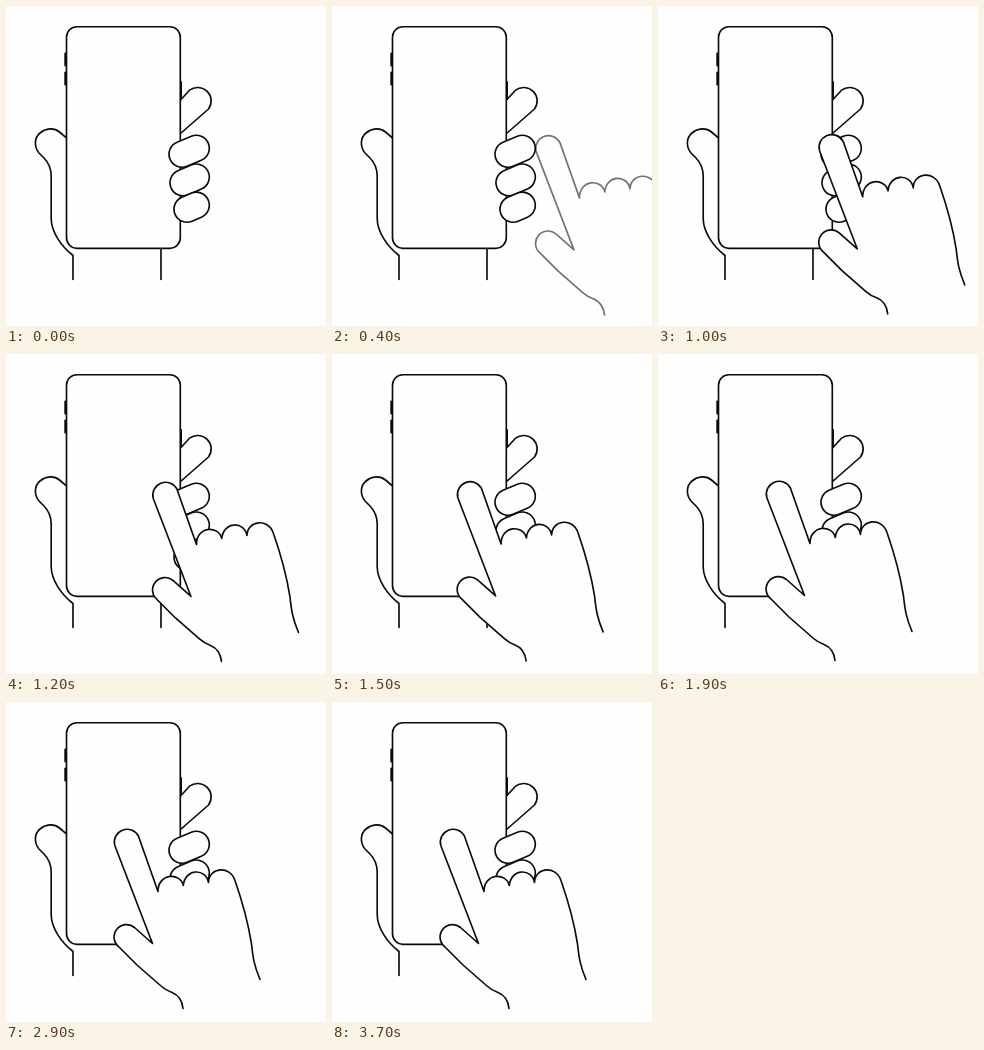
Write an HTML page that moves like this. It is 320 by 320 pixels and loops after 3.8 s.

```html
<!DOCTYPE html>
<html lang="en">
<head>
<meta charset="utf-8">
<title>Hand tapping a phone</title>
<style>
  html, body { margin: 0; width: 100%; height: 100%; overflow: hidden; background: #fefefe; }
  svg { display: block; width: 100vw; height: 100vh; }
  .line { fill: none; stroke: #0b0b0b; stroke-width: 1.65; stroke-linecap: round; stroke-linejoin: round; }
  .solid { fill: #fefefe; }
</style>
</head>
<body>
<svg viewBox="0 0 320 320">
  <g class="line">
    <!-- holding hand, behind the phone -->
    <path d="M60 131.500L53.500 126C48 121.500 40 122 34 127C28 132 28 141 33 147L38 152Q45 159 45.200 170V213C45.500 226 55 240 67 249.500V273.500" />
    <path d="M155 243V273.500" />
    <path d="M174.500 94L183.500 84.200A13.500 13.500 0 0 1 202.500 103L174.500 127.500" />
    <path d="M59.300 47.500V59.500M59.300 66.500V78.500M175 76V92" stroke-width="2" />
    <rect class="solid" x="60.500" y="20.700" width="113.800" height="221.600" rx="10.500" />
    <g id="grip" class="solid"></g>
  </g>
  <g id="hand" class="line" opacity="0">
    <path class="solid" d="M177 306.500C176 298 172.500 293 166 290.500Q160 288.500 155 284L131 263L112.500 244.500
      A12.300 12.300 0 0 1 128.500 225.500L146.500 241.500L108.800 143.500
      A12.800 12.800 0 0 1 132.400 134L152 189.500
      C152 171 174 170 177.300 183.500C179 166 200 166 202.500 180.500
      C203 165 224 163 229 178.500Q241 213 245.500 242C247 256 248 263 254 277.500" />
  </g>
</svg>
<script>
  const LOOP = 3800, STEP = 100;
  const FADE_END = 700, MOVE_END = 1740, SPEED = 0.07125, SINK = 0.025;
  const hand = document.getElementById('hand');
  const grip = document.getElementById('grip');

  // A rounded finger between two centres
  function finger(x1, y1, x2, y2, r) {
    const d = Math.hypot(x2 - x1, y2 - y1);
    const nx = (y2 - y1) / d * r, ny = (x1 - x2) / d * r;
    const arc = `A${r} ${r} 0 0 1 `;
    const path = document.createElementNS('http://www.w3.org/2000/svg', 'path');
    path.setAttribute('d', `M${x1 + nx} ${y1 + ny}L${x2 + nx} ${y2 + ny}` +
      `${arc}${x2 - nx} ${y2 - ny}L${x1 - nx} ${y1 - ny}${arc}${x1 + nx} ${y1 + ny}Z`);
    grip.append(path);
  }
  finger(176, 148.200, 190.300, 142.300, 13);
  finger(177, 176.700, 190.300, 171, 13);
  finger(181, 203.200, 190.300, 199.200, 13);

  function draw(now) {
    const t = Math.floor((now % LOOP) / STEP) * STEP;
    const x = Math.max(0, MOVE_END - t) * SPEED;
    hand.setAttribute('transform', `translate(${x} ${x * SINK})`);
    hand.setAttribute('opacity', Math.min(1, t / FADE_END));
  }

  let start;
  function tick(now) {
    start ??= now;
    draw(now - start);
    requestAnimationFrame(tick);
  }
  draw(0);
  requestAnimationFrame(tick);
</script>
</body>
</html>
```
